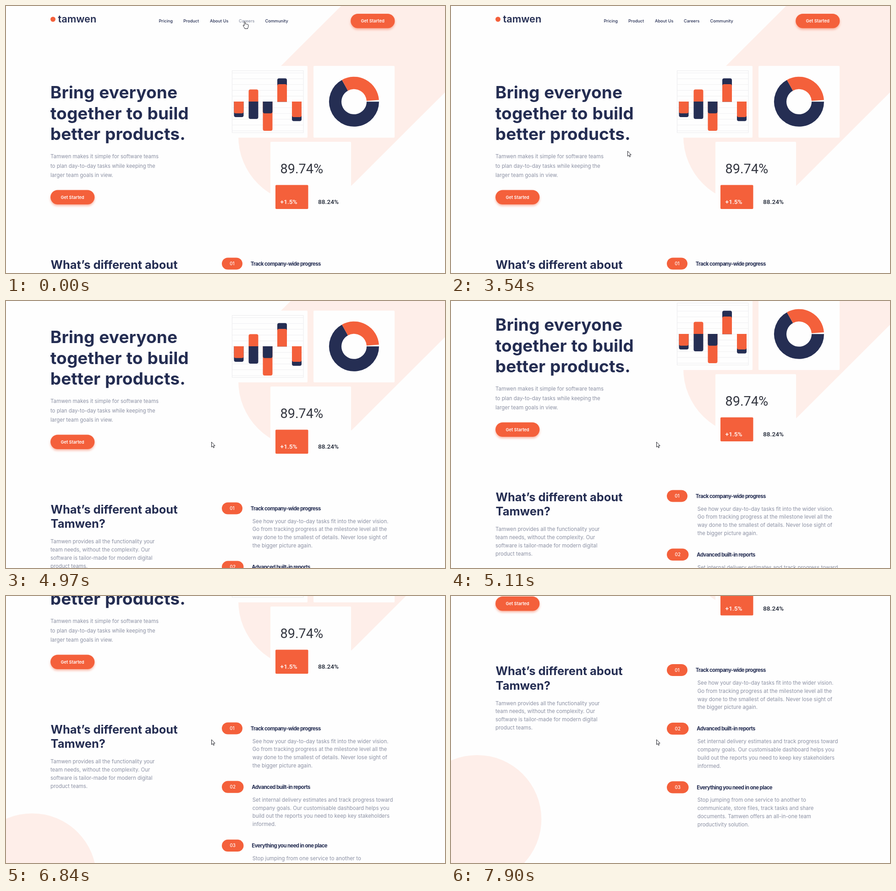
An HTML page for the animation above (8000 ms loop, 958 by 584 pixels).

```html
<!DOCTYPE html>
<html lang="en">
<head>
<meta charset="utf-8">
<title>Landing page scroll</title>
<style>
  html, body { margin: 0; width: 100%; height: 100%; overflow: hidden; background: #fefefe; }
  svg { display: block; }
  text { font-family: Inter, "Open Sans", sans-serif; white-space: pre; }
  .logo { font-size: 21.7px; font-weight: 600; fill: #242d52; }
  .nav { font-size: 9.15px; font-weight: 500; fill: #242d52; }
  .nav.hover { fill: #8a90a3; }
  .h1 { font-size: 37px; font-weight: 700; letter-spacing: .1px; word-spacing: 1px; fill: #242d52; }
  .h2 { font-size: 25.4px; font-weight: 700; fill: #242d52; }
  .title { font-size: 11.3px; font-weight: 700; letter-spacing: -.57px; fill: #242d52; }
  .body { font-size: 11.4px; fill: #8b90a3; }
  .label { font-size: 9.3px; font-weight: 600; fill: #fff; text-anchor: middle; }
  .num { font-size: 9.8px; font-weight: 500; fill: #fff; text-anchor: middle; }
  .big, .small { font-family: Roboto, sans-serif; }
  .big { font-size: 28.9px; fill: #333640; }
  .small { font-size: 13.7px; font-weight: 500; fill: #1d2433; }
  .light { fill: #fff; }
  .button rect { fill: #f4603b; filter: drop-shadow(0 3px 2.5px #f4603b77); }
  .button.hover rect { fill: #f46c4a; }
  .cursor { fill: #fff; stroke: #23242c; stroke-width: 1; stroke-linejoin: round; }
</style>
</head>
<body>
<svg width="958" height="584" viewBox="0 0 958 584"><g id="page"></g><path id="cursor" class="cursor"/></svg>
<script>
const NAVY = '#252e53', ORANGE = '#f4603b', PINK = '#feeee9', PAPER = '#fefefe';
const page = document.getElementById('page');
const cursor = document.getElementById('cursor');
const hotspots = [];

function add(tag, attrs, parent = page) {
  const el = document.createElementNS('http://www.w3.org/2000/svg', tag);
  for (const key in attrs) el.setAttribute(key, attrs[key]);
  return parent.appendChild(el);
}
function rect(x, y, width, height, fill, rx = 0, parent = page) {
  return add('rect', { x, y, width, height, fill, rx }, parent);
}
function text(cls, x, y, str, parent = page) {
  const el = add('text', { class: cls, x, y }, parent);
  el.textContent = str;
  return el;
}
function lines(cls, x, y, step, str) {
  str.split('|').forEach((line, i) => text(cls, x, y + i * step, line));
}
function button(x, y) {
  const el = add('g', { class: 'button' });
  rect(x, y, 96.2, 31.5, ORANGE, 15.75, el);
  text('label', x + 48, y + 19.3, 'Get Started', el);
  hotspots.push({ el, x, y, w: 96, h: 31.5 });
}
// Bar growing from y0 to y1, rounded at its far end.
function bar(x, y0, y1, fill) {
  const r = 4 * Math.sign(y1 - y0);
  add('path', { fill, d: `M${x} ${y0}V${y1 - r}q0 ${r} 4 ${r}h13q4 0 4 ${-r}V${y0}z` });
}
function ring(from, to, stroke) {
  const at = deg => {
    const a = deg * Math.PI / 180;
    return `${759.5 + 41 * Math.cos(a)} ${209.3 + 41 * Math.sin(a)}`;
  };
  const large = to - from > 180 ? 1 : 0;
  add('path', { d: `M${at(from)}A41 41 0 ${large} 1 ${at(to)}`, fill: 'none', stroke, 'stroke-width': 27 });
}

// Background shapes
add('path', { d: 'M654 285L1100 -161', stroke: PINK, 'stroke-width': 294, 'stroke-linecap': 'round' });
add('circle', { cx: 57, cy: 889.7, r: 140.3, fill: PINK });

// Header
add('circle', { cx: 102.5, cy: 29, r: 5.5, fill: ORANGE });
text('logo', 113.5, 35.5, 'tamwen');
[[333.5, 32, 'Pricing'], [387, 36, 'Product'], [445, 41, 'About Us'], [508, 36, 'Careers'], [565.5, 51, 'Community']]
  .forEach(([x, w, str]) => hotspots.push({ el: text('nav', x, 36.3, str), x, y: 27, w, h: 12 }));
button(752.2, 17);

// Hero
lines('h1', 96.8, 202.3, 45.3, 'Bring everyone|together to build|better products.');
lines('body', 97, 333, 20.5, 'Tamwen makes it simple for software teams|to plan day-to-day tasks while keeping the|larger team goals in view.');
button(97.1, 402.5);

// Bar chart
rect(483, 131, 175, 157, PAPER, 2);
add('rect', { x: 493.5, y: 141.5, width: 155.5, height: 135.5, fill: 'none', stroke: '#ebebed' });
for (let i = 0; i < 11; i++) rect(493.5, 146 + i * 12.65, 155.5, 1, '#efeff1');
bar(497.5, 209, 243, NAVY);
bar(497.5, 209, 234.7, ORANGE);
bar(529.5, 209, 182.5, ORANGE);
bar(529.5, 209, 247, NAVY);
bar(560.5, 209, 273, ORANGE);
bar(560.5, 209, 234.7, NAVY);
bar(592, 209.5, 158.3, NAVY);
bar(592, 209.5, 171, ORANGE);
bar(624, 209, 251.7, NAVY);
bar(624, 209, 243, ORANGE);

// Ring chart
rect(671, 131, 177, 157, PAPER, 2);
ring(0, 241, NAVY);
ring(241, 356, ORANGE);

// Figures
rect(577, 297, 176, 158, PAPER, 2);
text('big', 598.5, 365.5, '89.74%');
rect(588, 391.5, 71.5, 52.5, ORANGE, 2);
text('small light', 598.5, 433, '+1.5%');
text('small', 681, 433, '88.24%');

// Features
lines('h2', 97.6, 574.8, 31.6, 'What’s different about|Tamwen?');
lines('body', 97, 640, 17.85, 'Tamwen provides all the functionality your|team needs, without the complexity. Our|software is tailor-made for modern digital|product teams.');
[
  ['Track company-wide progress', 'See how your day-to-day tasks fit into the wider vision.|Go from tracking progress at the milestone level all the|way done to the smallest of details. Never lose sight of|the bigger picture again.'],
  ['Advanced built-in reports', 'Set internal delivery estimates and track progress toward|company goals. Our customisable dashboard helps you|build out the reports you need to keep key stakeholders|informed.'],
  ['Everything you need in one place', 'Stop jumping from one service to another to|communicate, store files, track tasks and share|documents. Tamwen offers an all-in-one team|productivity solution.']
].forEach(([title, body], i) => {
  const y = 550.4 + i * 128.2, w = i ? 47.5 : 45;
  rect(471, y, w, 26.2, ORANGE, 13.1);
  text('num', 471 + w / 2, y + 16.6, '0' + (i + 1));
  text('title', i ? 536.3 : 533.7, y + 17.2, title);
  lines('body', 537.7, y + 45.1, 17.8, body);
});

const ARROW = 'M.5 .5V11.6L3 9.3L4.8 13.2L6.5 12.4L4.8 8.6H8.2z';
const HAND = 'M-1 1q1.2-1.6 2.4 0v4.6q1.2-1 2.3 .2q1.2-.6 2.2 .5q1.4-.4 1.9 .9v3.6q0 2-1.3 3.2v1.6h-6.6v-1.3q-1.6-1.6-3.4-5.2q-.3-1.6 1.5-1.2l1 1.2z';

// [time, x, y]
const moves = [
  [0, 521, 34], [130, 545, 44], [270, 590, 52], [410, 650, 56], [550, 715, 53], [680, 765, 42], [820, 790, 36],
  [1100, 782, 42], [1240, 735, 85], [1380, 620, 170], [1510, 470, 275], [1650, 320, 360], [1790, 215, 405],
  [1920, 177, 419], [2070, 175, 421], [2190, 185, 425], [2330, 215, 421], [2470, 275, 392], [2600, 335, 345],
  [2740, 363, 321], [3540, 385, 317], [3690, 425, 311], [3840, 448, 308], [6700, 448, 313.5]
];
// [time, offset]: the wheel moves the page 68.5 px per notch
const scrolls = [
  [0, 0], [4530, 30.8], [4680, 68.5], [4970, 110], [5110, 137], [5860, 180], [5980, 205.5],
  [6550, 222], [6700, 262], [6840, 274], [7280, 312], [7440, 342.5], [7900, 401.5]
];
const current = (steps, t) => steps.findLast(s => s[0] <= t);

function draw(t) {
  const [, x, y] = current(moves, t);
  const [, offset] = current(scrolls, t);
  page.setAttribute('transform', `translate(0 ${-offset})`);
  let over = false;
  for (const h of hotspots) {
    const top = h.y - offset;
    const hit = x >= h.x && x <= h.x + h.w && y >= top && y <= top + h.h;
    h.el.classList.toggle('hover', hit);
    over = over || hit;
  }
  cursor.setAttribute('d', over ? HAND : ARROW);
  cursor.setAttribute('transform', `translate(${x} ${y})`);
}

const start = performance.now();
function tick() {
  draw((performance.now() - start) % 8000);
  requestAnimationFrame(tick);
}
tick();
</script>
</body>
</html>
```
